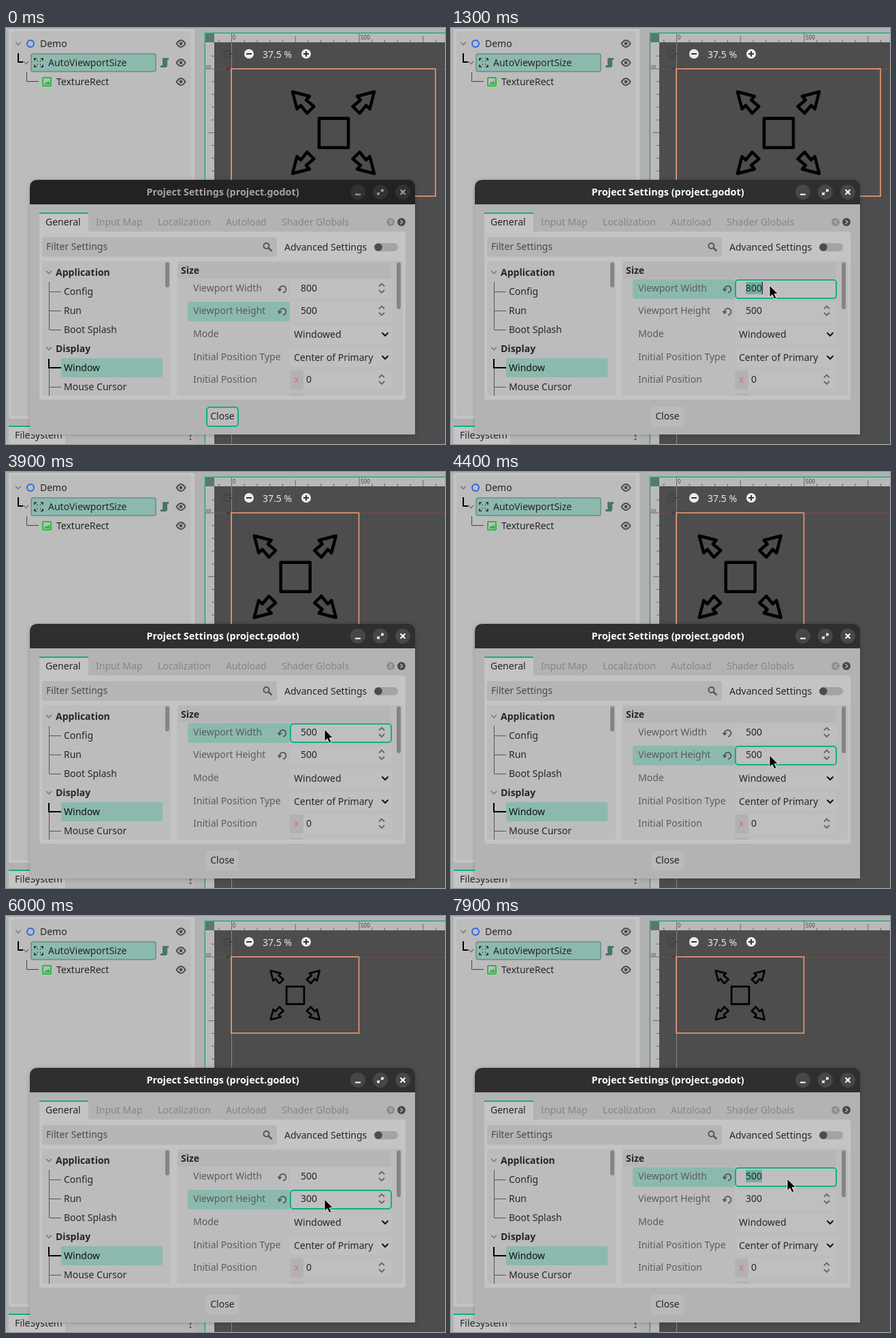
These frames come from a looping animation (645 px wide and 611 px high, 8000 ms). An HTML page:

```html
<!DOCTYPE html>
<html lang="en">
<head>
<meta charset="utf-8">
<title>Viewport size demo</title>
<style>
html, body { margin: 0; width: 100%; height: 100%; overflow: hidden; background: #b2b2b2; }
svg { display: block; width: 645px; height: 611px; }
text { font: 14px "Noto Sans", "Open Sans", sans-serif; white-space: pre; }
.b { font-weight: 700; }
</style>
</head>
<body>
<svg id="stage" viewBox="0 0 645 611" xmlns="http://www.w3.org/2000/svg"></svg>
<script>
const INK = '#262626', DIM = '#5c5c5c', TEAL = '#12ae8b', PICK = '#8cb9ae';
const OUTER = '#b3b3b3', PAGE = '#c4c4c4', LIST = '#bcbcbc';

// Markup helpers
const rect = (x, y, w, h, fill, r = 0, more = '') =>
  `<rect x="${x}" y="${y}" width="${w}" height="${h}" rx="${r}" fill="${fill}" ${more}/>`;
const line = (d, color, w = 1, more = '') =>
  `<path d="${d}" fill="none" stroke="${color}" stroke-width="${w}" ${more}/>`;
const text = (x, y, s, fill = INK, more = '') =>
  `<text x="${x}" y="${y}" fill="${fill}" ${more}>${s}</text>`;
const disc = (x, y, r, fill, more = '') =>
  `<circle cx="${x}" cy="${y}" r="${r}" fill="${fill}" ${more}/>`;
const chevron = (x, y, color = '#7d7d7d', w = 1.7, s = 3.5) =>
  line(`M${x - s} ${y - s / 2}l${s} ${s}l${s} ${-s}`, color, w, 'stroke-linecap="round"');
const group = (id, body, more = '') => `<g id="${id}" ${more}>${body}</g>`;

const eye = y => line(`M250.500 ${y}Q257 ${y - 10} 263.500 ${y}Q257 ${y + 10} 250.500 ${y}Z`, '#4c4c4c', 2) +
  disc(257, y, 2.4, '#4c4c4c');
const reset = y => line(`M402 ${y + 2}A4.800 4.800 0 1 1 407 ${y + 5.5}`, '#555', 1.8) +
  `<path d="M398.500 ${y}h7l-3.500 4.500z" fill="#555"/>`;
const spinner = y => line(`M548 ${y - 2.5}l4-4 4 4M548 ${y + 3}l4 4 4-4`, '#666', 1.8);

function sceneTree() {
  return rect(4, 0, 273, 574, PAGE, 3) + rect(8, 5, 264, 565, LIST, 4) +
    line('M4 .5H277', '#a8a8a8') +
    chevron(18, 23) + disc(36, 23, 5, 'none', 'stroke="#2a68e8" stroke-width="2"') + text(50, 28, 'Demo') +
    line('M18 37V50H25', '#000', 2) + chevron(29.5, 51) +
    rect(37, 38, 183, 26, PICK, 3, 'stroke="#6c8b84" stroke-width="1.500"') +
    line('M42 48v-3h3M51 45h3v3M54 54v3h-3M45 57h-3v-3', '#222', 1.6) +
    line('M45.500 48.500h1M50 48.500h1M45.500 53.500h1M50 53.500h1', '#222', 1.4) +
    text(62, 56, 'AutoViewportSize') +
    '<path d="M230 44h9v3h-2v8q0 3-3 3h-7v-3h3z" fill="#4a7568"/>' +
    line('M30.500 65V78.500H48', '#444') +
    rect(54, 73, 12, 12, 'none', 1, 'stroke="#1ec437" stroke-width="2"') +
    '<path d="M56 83l3-4 2 1 2-3 2 6z" fill="#1ec437"/>' +
    text(74, 84, 'TextureRect') + [23, 51, 79].map(eye).join('') +
    rect(4, 584, 83, 27, PAGE) + rect(87, 584, 190, 27, '#b6b6b6') + rect(4, 584, 83, 2, TEAL) +
    text(13, 603, 'FileSystem') + [599, 604].map(y => disc(271, y, 1.4, '#555')).join('');
}

function rulers() {
  let out = rect(306, 8, 339, 13, '#b9b9b9') + rect(293, 21, 13, 590, '#b9b9b9') +
    rect(291, 7, 15, 14, '#58796f');
  for (let k = -1; k < 17; k++) {
    const p = k * 18.75, len = k % 10 === 0 ? 13 : k % 5 === 0 ? 9 : 4;
    out += line(`M${331.5 + p} 21v${-len}`, '#666');
    if (p < 170) out += line(`M306 ${60 + p}h${-len}`, '#666');
  }
  return out + text(333, 17, '0', '#444', 'style="font-size:8px"') +
    text(521, 17, '500', '#444', 'style="font-size:8px"') +
    text(0, 0, '0', '#444', 'style="font-size:8px" transform="translate(301 59) rotate(-90)"');
}

function icon() {
  const arrow = 'M-60-60L-35-53.500L-40-48L-28.500-38.500L-38.500-28.500L-48-40L-53.500-35Z';
  const flips = ['1 1', '-1 1', '1 -1', '-1 -1'];
  return '<g fill="none" stroke="#000" stroke-width="4.500" stroke-linejoin="round">' +
    '<rect x="-21" y="-21" width="43" height="43"/>' +
    flips.map(f => `<path d="${arrow}" transform="scale(${f})"/>`).join('') + '</g>';
}

function canvasView() {
  const zoom = (x, d) => disc(x, 38, 7, '#ececec') + line(d, '#333', 2);
  return rect(291, 6, 354, 605, '#4d4d4d') + rulers() +
    line('M645 6.750H291.750V611', '#62bda6', 1.5) +
    line('M331.500 21V611', '#8a8a8a') + line('M306 60.500H645', '#b5313f') +
    line('M318 38h4M328 38h4M325 31v4M325 41v4M320 33l2 2M330 43l-2-2M330 33l-2 2M320 43l2-2', '#3b3b3b', 1.5) +
    line('M324 60h5M334 60h5', '#3d3d3d', 3) +
    rect(331, 60, 300, 187, 'none', 0, 'id="frame" stroke="#ee9a72" stroke-width="1.600"') +
    group('icon', icon()) +
    zoom(357, 'M353 38h8') + zoom(441, 'M437 38h8M441 34v8') +
    text(377, 44, '37.5 %', '#e8e8e8');
}

function sidebar() {
  const item = (y, s) => line(`M63.500 ${y}.500H81`, '#555') + text(85, y + 5, s);
  return rect(53, 342, 189, 198, LIST, 4) +
    chevron(63, 359) + text(73, 364, 'Application', INK, 'class="b"') +
    line('M63.500 373V443', '#555') + item(387, 'Config') + item(415, 'Run') + item(443, 'Boot Splash') +
    chevron(63, 471) + text(73, 476, 'Display', INK, 'class="b"') +
    line('M63.500 499V540', '#555') + rect(81, 485, 149, 28, PICK, 3) +
    line('M63 486V499H81', '#000', 2) + text(85, 504, 'Window', '#111') + item(527, 'Mouse Cursor') +
    rect(234, 344, 6, 37, '#858585', 3);
}

function settings() {
  const label = (y, s) => text(275, y, s, DIM);
  const field = (i, y) => rect(267, y, 150, 29, PICK, 4, `id="pick${i}"`) +
    rect(417, y, 150, 29, '#bfbfbf', 4) +
    rect(418, y + 1, 148, 27, 'none', 4, `id="edge${i}" stroke="${TEAL}" stroke-width="2"`) +
    label(y + 18, i ? 'Viewport Height' : 'Viewport Width') + reset(y + 14) +
    rect(433, y + 4, 24, 18, '#6fb09f', 0, `id="sel${i}"`) +
    text(433, y + 18, '', INK, `id="val${i}"`) +
    rect(457, y + 4, 1, 18, '#111', 0, `id="caret${i}"`) + group('spin' + i, spinner(y + 13));
  return rect(251, 342, 332, 198, LIST, 4) + rect(253, 344, 313, 24, '#b6b6b6', 3) +
    text(257, 361, 'Size', INK, 'class="b"') + field(0, 369) + field(1, 402) +
    label(454, 'Mode') + rect(417, 436, 150, 28, '#bfbfbf', 4) + text(423, 455, 'Windowed') +
    chevron(557, 450, '#111', 2, 4) +
    label(488, 'Initial Position Type') + rect(417, 470, 150, 28, '#bfbfbf', 4) +
    text(423, 489, 'Center of Primary') + chevron(557, 484, '#111', 2, 4) +
    label(521, 'Initial Position') + rect(417, 503, 150, 28, '#bfbfbf', 4) + rect(417, 503, 20, 28, '#b2b2b2', 3) +
    text(423, 521, 'x', '#d07863') + text(441, 521, '0') + spinner(516) +
    rect(417, 537, 20, 3, '#b2b2b2', 1) + rect(574, 344, 6, 69, '#858585', 3);
}

function dialog() {
  const tabs = [[132, 'Input Map'], [223, 'Localization'], [323, 'Autoload'], [405, 'Shader Globals']];
  return '<path d="M35 597V235q0-12 12-12H589q12 0 12 12V597z" id="bar"/>' + rect(35, 259, 566, 338, OUTER) +
    text(318.5, 246, 'Project Settings (project.godot)', '#fff', 'id="title" class="b" text-anchor="middle" style="font-size:14.4px"') +
    group('knobs', [517, 550, 583].map(x => disc(x, 241, 11, 'inherit')).join('')) +
    group('signs', line('M513 244.500h8', 'inherit', 2) + line('M551 237.500h3v3M549 244.500h-3v-3M554 237.500l-3 3M546 244.500l3-3', 'inherit', 1.5) +
      line('M579.500 237.500l7 7M586.500 237.500l-7 7', 'inherit', 2)).replace(/stroke="inherit"/g, '') +
    rect(49, 271, 72, 30, PAGE) + rect(49, 271, 72, 2, TEAL) + text(58, 290, 'General') +
    tabs.map(([x, s]) => text(x, 290, s, '#858585')).join('') +
    disc(565, 285, 6, '#8f8f8f') + line('M567 282l-3 3 3 3', OUTER, 1.6) +
    disc(581, 285, 6, '#484848') + line('M579.500 282l3 3-3 3', OUTER, 1.6) +
    rect(49, 299, 538, 247, PAGE, 4) + rect(49, 299, 12, 8, PAGE) +
    rect(53, 307, 345, 29, '#b5b5b5', 4) + text(59, 326, 'Filter Settings', '#4a4a4a') +
    disc(382.5, 320, 4, 'none', 'stroke="#555" stroke-width="2"') + line('M385.500 323l5 4.500', '#555', 2.4) +
    text(409, 327, 'Advanced Settings') + rect(541, 316, 35, 12, '#a3a3a3', 6) + disc(547, 322, 5.8, '#4c4c4c') +
    `<g clip-path="url(#lists)">${sidebar()}${settings()}</g>` +
    rect(294, 556, 48, 29, '#bababa', 4) +
    rect(295, 557, 46, 28, 'none', 4, `id="closeEdge" stroke="${TEAL}" stroke-width="2"`) +
    text(318, 575, 'Close', INK, 'text-anchor="middle"');
}

const stage = document.getElementById('stage');
stage.innerHTML = '<clipPath id="lists"><rect x="50" y="342" width="536" height="198"/></clipPath>' +
  rect(0, 0, 645, 611, '#b2b2b2') + sceneTree() + canvasView() +
  group('dialog', dialog(), 'style="filter:drop-shadow(0 1px 3px #0003)"') +
  group('mouse', '<path d="M0 0V17.500L4 13.700L7 20L10 18.700L7.200 12.600H12.500Z" fill="#000" stroke="#e8e8e8" stroke-width="1"/>');
const $ = id => document.getElementById(id);

// Each entry overrides the state from its time on
const steps = [
  [0, { active: false, row: 1, focus: false, edit: false, sel: false, caret: 0, vals: ['800', '500'], size: [800, 500] }],
  [1000, { active: true }],
  [1100, { row: 0, focus: true }],
  [1300, { edit: true, sel: true, caret: 3 }],
  [1800, { caret: 0 }],
  [2200, { sel: false, vals: ['5', '500'], caret: 1 }],
  [2400, { vals: ['50', '500'], caret: 2 }],
  [2600, { vals: ['500', '500'], caret: 3 }],
  [2800, { edit: false, caret: 0, size: [500, 500] }],
  [4400, { row: 1 }],
  [4500, { edit: true }],
  [4600, { sel: true, caret: 3 }],
  [5200, { caret: 0 }],
  [5400, { sel: false, vals: ['500', '3'], caret: 1 }],
  [5700, { vals: ['500', '30'], caret: 2 }],
  [5800, { vals: ['500', '300'], caret: 3 }],
  [6000, { edit: false, caret: 0, size: [500, 300] }],
  [7200, { row: 0, edit: true }],
  [7400, { sel: true, caret: 3 }],
  [7900, { caret: 0 }]
];

// Pointer path: time, x, y
const path = [
  [200, 530, 4], [300, 524, 60], [400, 512, 135], [500, 498, 215], [600, 485, 285], [700, 475, 340],
  [800, 470, 368], [900, 468, 378], [3900, 468, 378], [4000, 468, 385], [4100, 468, 396], [4200, 468, 408],
  [4300, 468, 416], [6400, 468, 416], [6500, 484, 410], [6600, 514, 394], [6700, 537, 380], [6800, 527, 376],
  [6900, 506, 382], [7000, 494, 386]
];

const show = (id, on) => $(id).setAttribute('visibility', on ? 'visible' : 'hidden');
const set = (id, attrs) => { for (const k in attrs) $(id).setAttribute(k, attrs[k]); };

function draw(t) {
  const s = Object.assign({}, ...steps.filter(e => e[0] <= t).map(e => e[1]));
  set('bar', { fill: s.active ? '#2f2f2f' : '#222' });
  set('title', { fill: s.active ? '#fff' : '#a4a4a4' });
  set('knobs', { fill: s.active ? '#474747' : '#323232' });
  set('signs', { stroke: s.active ? '#fff' : '#a0a0a0' });
  show('closeEdge', !s.focus);
  s.vals.forEach((v, i) => {
    const here = s.row === i;
    show('pick' + i, here);
    show('edge' + i, here && s.focus);
    show('sel' + i, here && s.sel && s.edit);
    show('caret' + i, here && s.caret > 0);
    show('spin' + i, !(here && s.edit));
    set('caret' + i, { x: 433 + 8 * s.caret });
    if ($('val' + i).textContent !== v) $('val' + i).textContent = v;
  });
  const [w, h] = s.size.map(n => n * 0.375);
  set('frame', { width: w, height: h - 0.5 });
  set('icon', { transform: `translate(${331 + w / 2} ${60 + h / 2}) scale(${Math.min(w, h) / 187.5})` });
  const at = path.filter(p => p[0] <= t).pop();
  show('mouse', at);
  if (at) set('mouse', { transform: `translate(${at[1]} ${at[2]})` });
}

const start = performance.now();
function tick() {
  draw((performance.now() - start) % 8000);
  requestAnimationFrame(tick);
}
tick();
</script>
</body>
</html>
```
